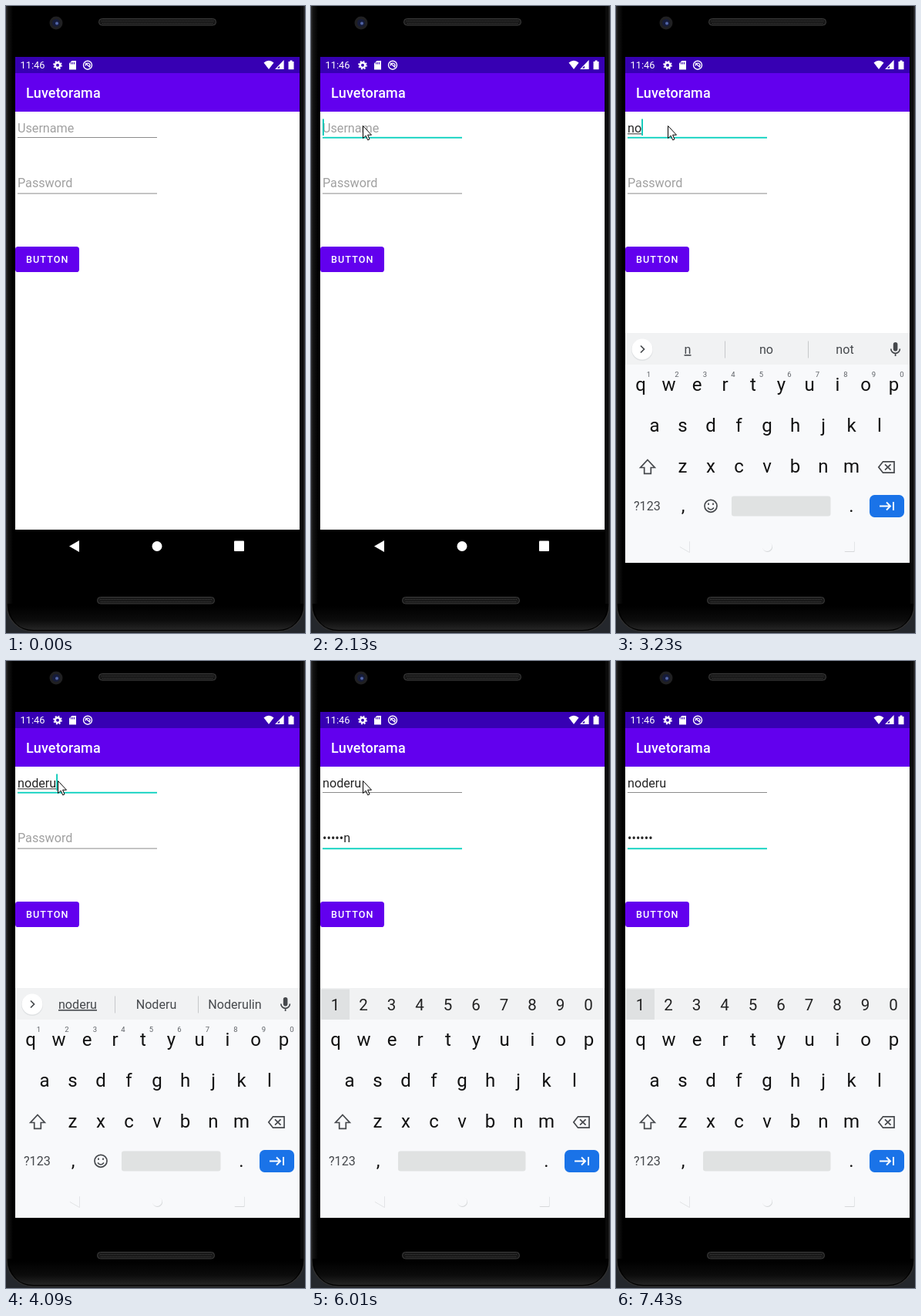
An HTML page that plays this animation: 388 px wide and 813 px high, repeating every 8000 ms.

```html
<!DOCTYPE html>
<html lang="en">
<head>
<meta charset="utf-8">
<title>Login form</title>
<style>
  html, body { margin: 0; width: 100%; height: 100%; overflow: hidden; background: #000; }
  svg { display: block; width: 388px; height: 813px; font-family: Roboto, sans-serif; }
  text { white-space: pre; }
  .mid { text-anchor: middle; }
  .line { fill: none; stroke: #45484c; stroke-width: 1.7; }
  .field { font-size: 16.16px; }
  .key { font-size: 24px; fill: #111; }
  .num { font-size: 20.5px; fill: #222; }
  .tiny { font-size: 9.5px; fill: #5f6368; }
  .word { font-size: 16.1px; fill: #46494d; }
</style>
</head>
<body>
<svg viewBox="0 0 388 813">
  <defs>
    <linearGradient id="chin" x2="0" y2="1">
      <stop offset="0" stop-color="#000"/><stop offset=".6" stop-color="#0c0c0c"/><stop offset="1" stop-color="#252525"/>
    </linearGradient>
    <linearGradient id="side">
      <stop offset="0" stop-color="#161616"/><stop offset="1" stop-color="#000"/>
    </linearGradient>
    <clipPath id="buttonClip"><rect x="12" y="312" width="83" height="33" rx="3.6"/></clipPath>
    <g id="speaker">
      <rect x=".5" y=".5" width="152" height="8.5" rx="4" fill="#191919" stroke="#3c3c3c"/>
      <path d="M4 3.5H149M5 6.5H149" stroke="#3a3a3a" stroke-width="1.2" stroke-dasharray="1 1"/>
    </g>
    <g id="nav">
      <path d="M82 700.5 95 693V708Z"/><circle cx="196" cy="700.5" r="6.5"/><rect x="296" y="693.5" width="13" height="13.5" rx="1"/>
    </g>
  </defs>

  <!-- phone body -->
  <rect width="388" height="813" fill="#24272c"/>
  <rect x="1" y="-60" width="386" height="871" rx="34" fill="#000" stroke="#2e2e2e" stroke-width="1.5"/>
  <rect x="2" y="0" width="7" height="775" fill="url(#side)"/>
  <rect x="382" y="0" width="4" height="775" fill="#0b0b0b"/>
  <path d="M3 778H385Q380 809 352 809H36Q8 809 3 778Z" fill="url(#chin)"/>
  <use href="#speaker" x="120" y="16"/>
  <use href="#speaker" x="118" y="766"/>
  <circle cx="65" cy="22" r="8.5" fill="#202022"/>
  <circle cx="65" cy="22" r="5" fill="#161c3a"/>
  <circle cx="66" cy="22.5" r="2" fill="#5264a6"/>

  <!-- screen -->
  <rect x="12" y="66" width="369" height="613" fill="#fff"/>
  <rect x="12" y="66" width="369" height="21" fill="#3700b3"/>
  <rect x="12" y="87" width="369" height="50" fill="#6200ee"/>
  <g fill="#fff">
    <text x="18.5" y="81.3" font-size="12.8">11:46</text>
    <g fill="none" stroke="#fff">
      <circle cx="67" cy="76.7" r="3.2" stroke-width="2.5"/>
      <circle cx="67" cy="76.7" r="5" stroke-width="1.7" stroke-dasharray="1.96"/>
      <circle cx="106" cy="76.7" r="5.5" stroke-width="1.4"/>
      <path d="M103 74 109 79.5M103.4 77.5A2.8 2.8 0 1 1 108 79" stroke-width="1.3"/>
      <path d="M350.5 81.3H360V71.5Z" stroke-width="1.2"/>
    </g>
    <path d="M85.5 71H91V82.5H82V74.5Z"/>
    <path d="M84.5 73V75.5M86.5 73V75.5M88.5 73V75.5" stroke="#3700b3"/>
    <path d="M334.5 73.5Q341 68 347.5 73.5L341 82Z"/>
    <path d="M355 77 360 72V81.5H355Z"/>
    <path d="M366.5 72H368.5V70.5H371.5V72H373.5V82.3H366.5Z"/>
    <text x="26" y="119" font-size="18" font-weight="500" letter-spacing=".15">Luvetorama</text>
    <use href="#nav"/>
  </g>

  <g class="field">
    <text id="nameText" x="15" y="163.8"></text>
    <rect id="nameMark" x="15" y="165.3" height="1" fill="#333"/>
    <rect id="nameLine" x="15"  width="181"/>
    <text id="passText" x="15" y="235.2"></text>
    <rect id="passLine" x="15" width="181"/>
    <rect id="caret" width="1.8" height="21.5" fill="#03c8b6"/>
  </g>

  <!-- button -->
  <rect id="shadow" x="13" y="315" width="81" height="32.5" rx="4" fill="#000" opacity=".16"/>
  <g clip-path="url(#buttonClip)">
    <rect x="12" y="312" width="83" height="33" fill="#6200ee"/>
    <circle id="ripple" cx="63" cy="329" fill="#fff"/>
  </g>
  <text x="26" y="333" font-size="12.57" font-weight="500" letter-spacing="1.12" fill="#fff">BUTTON</text>

  <!-- keyboard -->
  <g id="board">
    <rect x="12" y="424" width="369" height="298" fill="#f8f9fb"/>
    <rect x="12" y="424" width="369" height="41" fill="#f1f2f3"/>
    <use href="#nav" x=".6" y="1" fill="#d6d8da"/>
    <use href="#nav" fill="#f8f9fb"/>
    <g id="keys" class="mid"></g>
    <g id="wordRow" class="mid">
      <circle cx="34" cy="446" r="14" fill="#dfe1e3"/>
      <circle cx="34" cy="445" r="13.5" fill="#fff"/>
      <path class="line" d="M32 440.5 36.5 445 32 449.5"/>
      <rect x="359.8" y="436" width="5.6" height="11.5" rx="2.8" fill="#45484c"/>
      <path class="line" d="M356.8 444.5A5.8 5.8 0 0 0 368.4 444.5M362.6 450.5V454"/>
      <g id="words"></g>
      <g class="line">
        <circle cx="123" cy="648.3" r="8"/>
        <path d="M119 650.5Q123 655.5 127 650.5M120 644.5V647M126 644.5V647"/>
      </g>
    </g>
    <g id="digitRow" class="mid"><rect x="13" y="425.5" width="37" height="39.5" fill="#dfe1e2"/></g>
    <rect id="space" y="635.5" height="26" rx="3" fill="#e0e2e2"/>
    <text class="word" x="23" y="654">?123</text>
    <path class="line" d="M41 588.5 50.3 598.5H45.3V606.3H36.7V598.5H31.7Z"/>
    <path class="line" d="M346.5 590.8H361V605.2H346.5L340.8 598ZM349 594.3 356.5 601.7M356.5 594.3 349 601.7"/>
    <rect x="329" y="634" width="45" height="29" rx="6.5" fill="#1a73e8"/>
    <path d="M342 648.5H355.5M351 643.5 356 648.5 351 653.5M360 643V654" fill="none" stroke="#fff" stroke-width="1.9"/>
  </g>

  <path id="pointer" d="M.5 .5V16.5L4.2 13.2 6.7 18.8 9 17.8 6.6 12.2H11.5Z" fill="#fff" stroke="#000"/>
</svg>

<script>
const $ = id => document.getElementById(id);
const set = (id, attrs) => { for (const k in attrs) $(id).setAttribute(k, attrs[k]); };
const show = (id, on) => { $(id).style.display = on ? '' : 'none'; };

function addText(parent, cls, x, y, text) {
  const el = document.createElementNS('http://www.w3.org/2000/svg', 'text');
  el.setAttribute('class', cls);
  el.setAttribute('x', x);
  el.setAttribute('y', y);
  el.textContent = text;
  $(parent).append(el);
  return el;
}

const PITCH = 36.5;
const addRow = (parent, cls, x, y, chars) =>
  [...chars].forEach((c, i) => addText(parent, cls, x + i * PITCH, y, c));

addRow('keys', 'key', 32, 499, 'qwertyuiop');
addRow('keys', 'key', 50, 551.5, 'asdfghjkl');
addRow('keys', 'key', 86.5, 604.5, 'zxcvbnm');
addText('keys', 'key', 87, 656, ',');
addText('keys', 'key', 305.5, 656, '.');
addRow('wordRow', 'tiny', 42.5, 481, '1234567890');
addRow('digitRow', 'num', 31.5, 453, '1234567890');

// Each entry changes part of the state from its time on.
const PASS = 'netbon';
const at = (x, y) => ({ pointer: [x, y] });
const typed = (name, words) => words ? { name, words, caret: 1 } : { name, caret: 1 };
const secret = n => ({ pass: '•'.repeat(n - 1) + PASS[n - 1], caret: 1 });
const steps = [
  [0, { name: '', pass: '', words: [], focus: '', caret: 0, board: '', pointer: null, ripple: 0, glow: 0 }],
  [870, at(0, 345)], [990, at(23, 315)], [1140, at(72, 240)], [1260, at(105, 180)],
  [1410, at(96, 156)], [1530, at(82, 140)], [1650, at(74, 146)], [1770, at(69, 152)], [1890, at(67, 155)],
  [2010, { focus: 'name' }], [2130, { caret: 1 }],
  [2410, { board: 'words' }], [2560, { caret: 0 }],
  [2990, typed('n')],
  [3110, typed('n', ['n', 'no', 'not'])],
  [3230, typed('no')],
  [3380, typed('nod', ['no', 'not', 'now'])],
  [3660, typed('node', ['nod', 'node', 'nods'])],
  [3780, typed('noder', ['node', 'nodes', 'noded'])],
  [4090, typed('noderu', ['noderu', 'Noderu', 'Noderulin'])],
  [4210, { focus: 'pass' }], [4330, { board: 'digits' }],
  [4600, secret(1)], [4750, secret(2)], [5030, secret(3)],
  [5180, secret(4)], [5300, secret(5)], [5450, secret(6)],
  [6010, { caret: 0 }],
  [6160, at(18, 204)], [6310, { ...at(52, 282), caret: 1 }], [6430, at(67, 327)],
  [6710, { ripple: 30, glow: .18 }],
  [6860, { ...at(70, 368), ripple: 62, glow: .14 }],
  [7010, { ...at(92, 611), ripple: 0, glow: 0, pass: '••••••', caret: 0 }],
  [7160, at(243, 722)], [7310, at(268, 790)], [7430, { pointer: null }],
];

function drawField(id, hint, value, y, focused) {
  const text = $(id + 'Text');
  text.textContent = value || hint;
  text.setAttribute('fill', value ? '#262626' : '#a0a0a0');
  set(id + 'Line', focused
    ? { y: y - .2, height: 1.8, fill: '#03d0bd' }
    : { y, height: 1, fill: '#8c8c8c' });
  const width = value ? text.getComputedTextLength() : 0;
  if (focused) set('caret', { x: 15 + width, y: y - 23.5 });
  return width;
}

function draw(s) {
  const onName = s.focus === 'name';
  const width = drawField('name', 'Username', s.name, 170, onName);
  drawField('pass', 'Password', s.pass, 242.6, s.focus === 'pass');
  set('nameMark', { width: onName ? width : 0 });
  show('caret', s.caret);

  show('board', s.board);
  show('wordRow', s.board === 'words');
  show('digitRow', s.board === 'digits');
  const left = s.board === 'digits' ? 113 : 150;
  set('space', { x: left, width: 278.5 - left });
  $('words').textContent = '';
  s.words.forEach((w, i) => {
    const el = addText('words', 'word', 93 + i * 102, 451, w);
    if (!i) el.setAttribute('text-decoration', 'underline');
  });
  if (s.words.length) {
    for (const x of [141, 249]) {
      const bar = $('nameMark').cloneNode();
      bar.removeAttribute('id');
      for (const [k, v] of Object.entries({ x, y: 434.5, width: 1, height: 22, fill: '#c6c8ca' })) bar.setAttribute(k, v);
      $('words').append(bar);
    }
  }

  show('shadow', s.glow);
  set('ripple', { r: s.ripple, opacity: s.glow });
  show('pointer', s.pointer);
  if (s.pointer) set('pointer', { transform: `translate(${s.pointer})` });
}

let last = -1;
function frame() {
  const t = performance.now() % 8000;
  const past = steps.filter(([time]) => time <= t);
  if (past.length !== last) {
    last = past.length;
    draw(Object.assign({}, ...past.map(([, change]) => change)));
  }
  requestAnimationFrame(frame);
}
frame();
</script>
</body>
</html>
```
